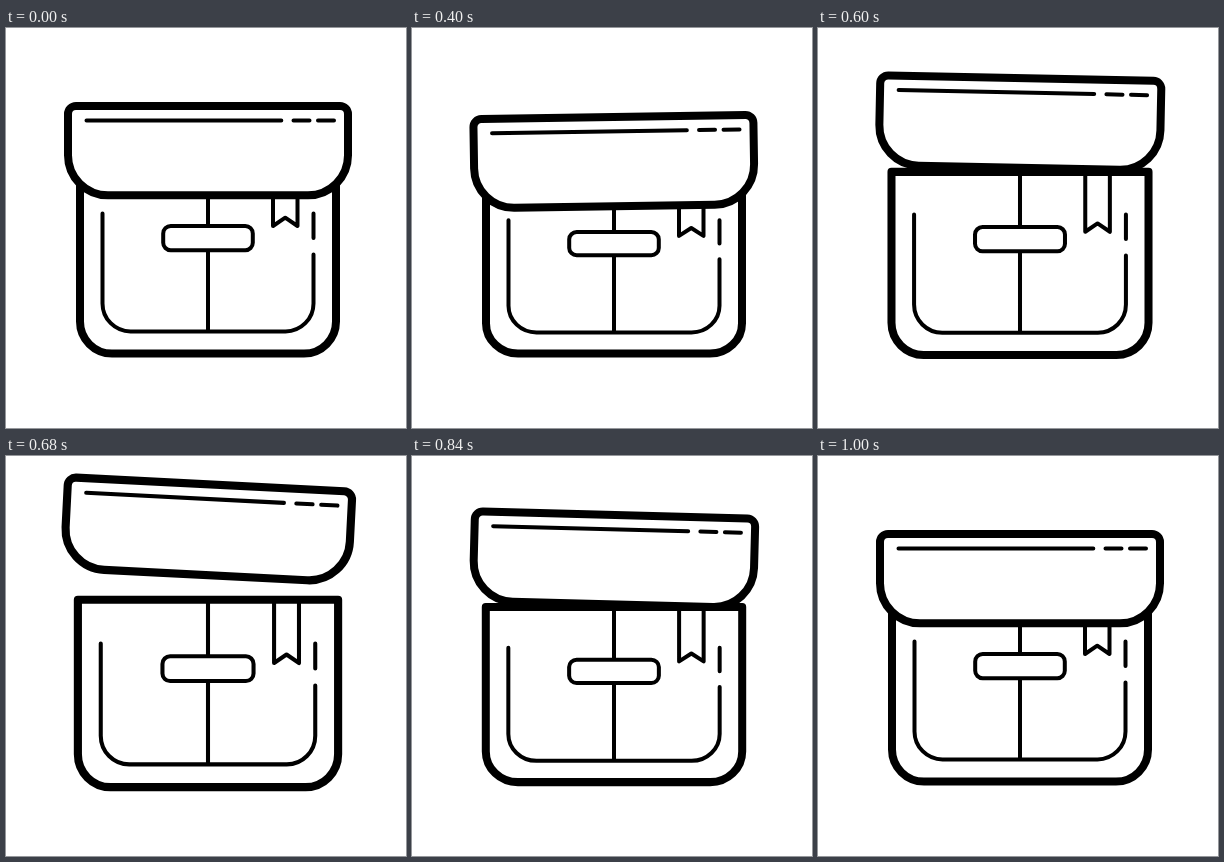
An HTML page with a canvas for the animation above (1120 ms loop, 400 px wide and 400 px high).

```html
<!DOCTYPE html>
<html lang="en">
<head>
<meta charset="utf-8">
<title>Bouncing box</title>
<style>
html, body { margin: 0; width: 100%; height: 100%; overflow: hidden; background: #fff; }
canvas { display: block; width: 400px; height: 400px; }
</style>
</head>
<body>
<canvas id="stage" width="400" height="400"></canvas>
<script>
const ctx = document.getElementById('stage').getContext('2d');
const LOOP = 1120, STEP = 40, REST = 160;
const CX = 202, LID_Y = 122, TOP = 143, BOTTOM = 325.6, SEAM = 303.4;

// Moments of the bounce, in ms
const BEGIN = 90, SQUASH = 436, PEAK = 722, LAND = 936, END = 1000;

const lidShift = swing([BEGIN, 0], [SQUASH, 11.3], [PEAK, -52.2], [LAND, 5], [END, 0]);
const lidTilt = swing([BEGIN, 0], [240, 2.5], [455, -1.5], [PEAK, 3.2], [950, 0]);
const bodyTop = swing([BEGIN, TOP], [SQUASH, 152], [610, 143.8], [735, 143.8], [880, 152.5], [END, TOP]);
const ribbonDrop = swing([BEGIN, 0], [340, 4], [540, 4], [PEAK, 7], [900, 0]);

// Cosine easing from each turning point to the next
function swing(...points) {
  return t => {
    const i = points.findIndex(p => p[0] > t);
    if (i < 1) return points[i === 0 ? 0 : points.length - 1][1];
    const [t0, v0] = points[i - 1], [t1, v1] = points[i];
    return v0 + (v1 - v0) * (1 - Math.cos(Math.PI * (t - t0) / (t1 - t0))) / 2;
  };
}

// Builds the path in moved space but keeps the pen undistorted
function draw(place, width, shape, filled) {
  ctx.save();
  place();
  ctx.beginPath();
  shape();
  ctx.restore();
  if (filled) ctx.fill();
  ctx.lineWidth = width;
  ctx.stroke();
}

function line(x1, y1, x2, y2) {
  ctx.moveTo(x1, y1);
  ctx.lineTo(x2, y2);
}

// Open U shape with rounded lower corners
function cup(left, right, leftTop, rightTop, bottom, radius) {
  ctx.moveTo(left, leftTop);
  ctx.arcTo(left, bottom, CX, bottom, radius);
  ctx.arcTo(right, bottom, right, rightTop, radius);
  ctx.lineTo(right, rightTop);
}

function bodyShape() {
  cup(74, 330, TOP, TOP, BOTTOM, 32);
  ctx.closePath();
}

function bodyLines() {
  line(CX, TOP, CX, SEAM);
  cup(96.5, 307.5, 185.5, 226.5, SEAM, 28);
  line(307.5, 185.5, 307.5, 210);
}

function handleShape() {
  ctx.roundRect(157.2, 198, 89.6, 24.2, 7.5);
}

function ribbonShape(drop) {
  const left = 267, right = 291.5, tip = 198 + drop;
  ctx.moveTo(left, TOP);
  ctx.lineTo(left, tip);
  ctx.lineTo((left + right) / 2, tip - 8.3);
  ctx.lineTo(right, tip);
  ctx.lineTo(right, TOP);
}

function lidShape() {
  ctx.roundRect(62, 78, 280, 89.3, [8, 8, 40, 40]);
}

function lidLines() {
  const y = 92.4;
  line(80.5, y, 275.3, y);
  line(287.5, y, 303.5, y);
  line(312, y, 328, y);
}

function render(t) {
  const lift = lidShift(t), top = bodyTop(t);
  // The higher the lid flies, the more everything swells
  const swell = Math.pow(Math.max(0, -lift) / 50, 2.5);
  const s = 1 + 0.0175 * swell;
  const sy = (BOTTOM + 5.9 * swell - top) / (BOTTOM - TOP);

  const onBody = () => {
    ctx.translate(CX, top);
    ctx.scale(s, sy);
    ctx.translate(-CX, -TOP);
  };
  const onLid = () => {
    ctx.translate(CX, LID_Y + lift);
    ctx.rotate(lidTilt(t) * Math.PI / 180);
    ctx.scale(s, s);
    ctx.translate(-CX, -LID_Y);
  };
  const thick = 8 * s, thin = 4 * s;

  ctx.fillStyle = '#fff';
  ctx.fillRect(0, 0, 400, 400);
  ctx.strokeStyle = '#000';
  ctx.lineCap = ctx.lineJoin = 'round';

  draw(onBody, thick, bodyShape, true);
  draw(onBody, thin, bodyLines);
  draw(onBody, thin, handleShape, true);
  draw(onBody, thin, () => ribbonShape(ribbonDrop(t)));
  draw(onLid, thick, lidShape, true);
  draw(onLid, thin, lidLines);
}

const start = performance.now();
function tick() {
  const t = (performance.now() - start) % LOOP;
  const held = Math.floor(t / STEP) * STEP;
  render(held < REST ? 0 : held);
  requestAnimationFrame(tick);
}
tick();
</script>
</body>
</html>
```
